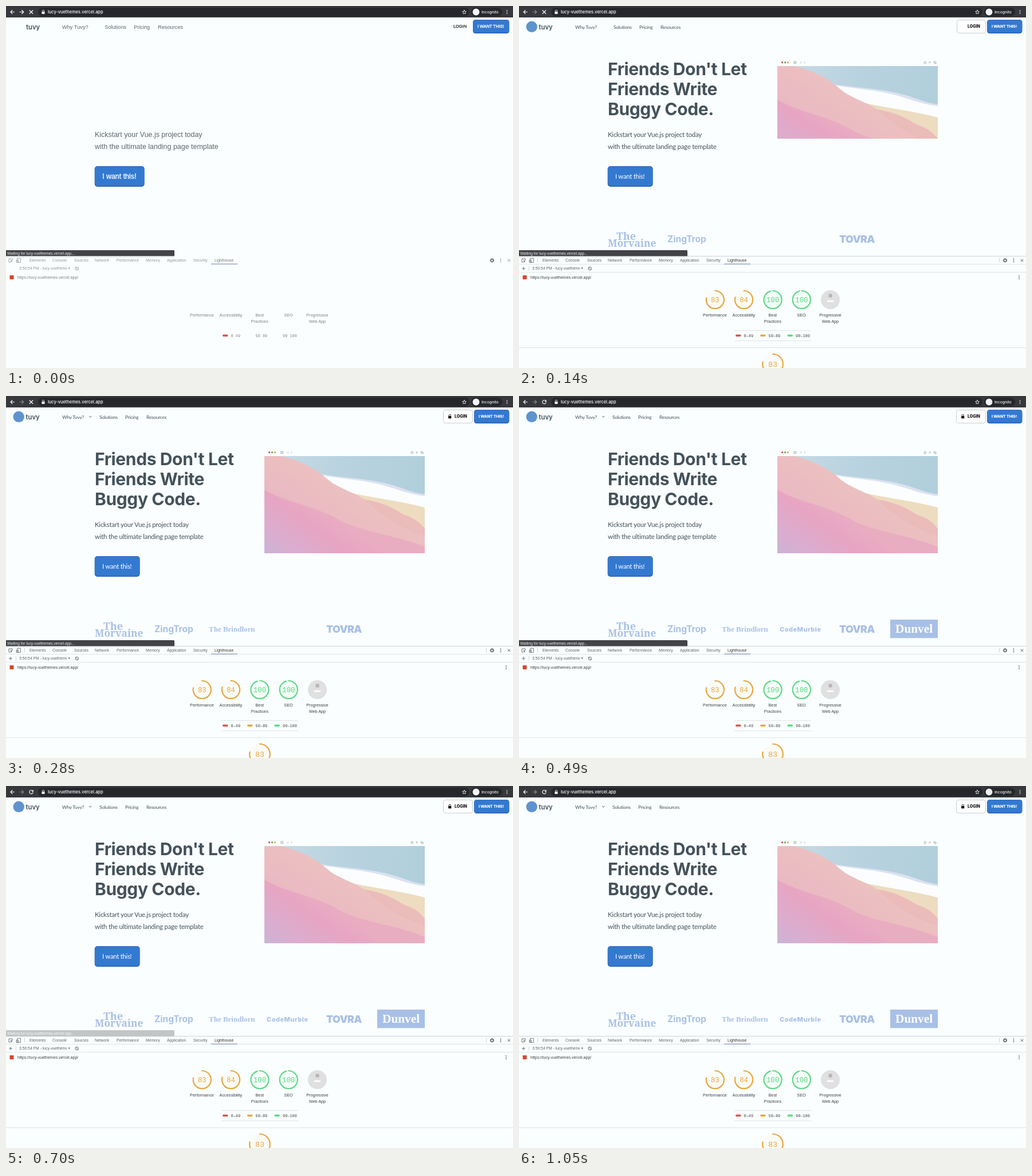
Recreate the animation shown at these times as an HTML page. Size 885x633 px, loop 1190 ms.

```html
<!DOCTYPE html>
<html lang="en">
<head>
<meta charset="utf-8">
<title>Landing page reload</title>
<style>
  html, body { margin: 0; width: 100%; height: 100%; overflow: hidden; background: #fafefe; }
  svg { display: block; width: 885px; height: 633px; }
  text { white-space: pre; }
  .sans { font-family: "Liberation Sans", Arial, sans-serif; }
  .lato { font-family: Lato, sans-serif; }
  .inter { font-family: Inter, sans-serif; }
  .mono { font-family: "Liberation Mono", monospace; }
  .serif { font-family: "Noto Serif", serif; }
  .times { font-family: "Liberation Serif", serif; }
  .line { fill: none; stroke-linecap: round; stroke-linejoin: round; }
</style>
</head>
<body>
<svg id="stage" viewBox="0 0 885 633" xmlns="http://www.w3.org/2000/svg"></svg>
<script>
const LOOP = 1190;
const INK = '#44525b', BLUE = '#3379d0', PRESS = '#a9c0e6';
const ORANGE = '#e9a63f', GREEN = '#5ed985', RED = '#d9534f';

const tracks = [];

// Group whose opacity follows a table of [time, opacity] steps.
function part(steps, ...content) {
  tracks.push(steps);
  return `<g data-track="${tracks.length - 1}">${content.join('')}</g>`;
}
const during = (from, to, ...content) => part([[from, 1], [to, 0]], ...content);
const after = (from, ...content) => part([[from, 1]], ...content);

const text = (x, y, str, size, font, fill, more = '') =>
  `<text x="${x}" y="${y}" font-size="${size}" class="${font}" fill="${fill}" ${more}>${str}</text>`;
const rect = (x, y, w, h, fill, r = 0, more = '') =>
  `<rect x="${x}" y="${y}" width="${w}" height="${h}" rx="${r}" fill="${fill}" ${more}/>`;
const circle = (x, y, r, fill, more = '') =>
  `<circle cx="${x}" cy="${y}" r="${r}" fill="${fill}" ${more}/>`;
const line = (d, stroke, width = 1) =>
  `<path class="line" d="${d}" stroke="${stroke}" stroke-width="${width}"/>`;
const shape = (d, fill, more = '') => `<path d="${d}" fill="${fill}" ${more}/>`;
const spacing = v => `letter-spacing="${v}"`;
const dots = (x, y, fill) => [-2.6, 0, 2.6].map(d => circle(x, y + d, .85, fill)).join('');
const padlock = (x, y, fill) =>
  rect(x - 2.6, y - .6, 5.2, 4.2, fill, .6) + line(`M${x - 1.6} ${y - .6}v-1.2a1.6 1.6 0 0 1 3.2 0v1.2`, fill, .9);

function browserBar() {
  const forward = 'M24 10.5h6.5M27.7 7.5l3 3-3 3';
  const pill = '#26272a';
  return [
    rect(0, 0, 885, 20, '#37383c'),
    rect(56, 3, 753, 15, pill, 7.5),
    rect(812, 3, 54, 15, pill, 7.5),
    line('M14.5 10.5h-6.5M11 7.5l-3 3 3 3', '#f1f3f4', 1.2),
    line(forward, '#85878a', 1.2),
    during(0, 70, line(forward, '#f1f3f4', 1.2)),
    during(0, 490, line('M41.2 7.7l5.6 5.6M46.8 7.7l-5.6 5.6', '#f1f3f4', 1.3)),
    after(490, line('M46.7 8.6a3.2 3.2 0 1 0 .5 2.6', '#f1f3f4', 1.2), shape('M47.8 6.6v3.5h-3.5z', '#f1f3f4')),
    padlock(65, 10.4, '#e8eaed'),
    text(73, 13, 'lucy-vuethemes.vercel.app', 7.4, 'inter', '#fff', 'font-weight="500"'),
    line('M800 7.2l1 2.2 2.4.3-1.8 1.6.5 2.4-2.1-1.2-2.1 1.2.5-2.4-1.8-1.6 2.4-.3z', '#e8eaed', .9),
    circle(820.5, 10.5, 5.9, '#f1f3f4'),
    text(830, 13, 'Incognito', 6.7, 'inter', '#f1f3f4', 'font-weight="500"'),
    dots(874.5, 10.5, '#e8eaed')
  ].join('');
}

function button(x, y, w, h, r) {
  return rect(x, y, w, h, '#2a63b3', r) + rect(x + .6, y + .6, w - 1.2, h - 2.2, BLUE, r - .5);
}

// First paint, before the web fonts are in.
function plainPage() {
  const nav = [[98, 'Why Tuvy?'], [172, 'Solutions'], [223, 'Pricing'], [265, 'Resources']];
  const grey = '#5d666c';
  return during(0, 70,
    text(35, 40.5, 'tuvy', 11.3, 'inter', INK, 'font-weight="600"'),
    ...nav.map(([x, s]) => text(x, 39.5, s, 9.24, 'sans', grey)),
    text(781, 38, 'LOGIN', 7.4, 'sans', '#222', 'stroke="#222" stroke-width=".25"'),
    button(815, 24, 63.5, 24, 4.5),
    text(823, 38, 'I WANT THIS!', 7.4, 'sans', '#fff', 'stroke="#fff" stroke-width=".35"'),
    text(155, 229, 'Kickstart your Vue.js project today', 12.44, 'sans', grey),
    text(155, 249.5, 'with the ultimate landing page template', 12.44, 'sans', grey),
    button(154.7, 280, 87, 36, 5),
    text(168, 301.5, 'I want this!', 12.44, 'sans', '#f2f8ff', 'stroke="#f2f8ff" stroke-width=".4"'));
}

function navLinks(x) {
  return [[0, 'Solutions'], [45, 'Pricing'], [82, 'Resources']]
    .map(([dx, s]) => text(x + dx, 39.5, s, 8.4, 'lato', INK, spacing(-.25))).join('');
}

const loginBox = x => rect(x, 24.5, 814.5 - x, 22.8, '#fff', 4, 'stroke="#c9ced2" stroke-width="1"');

function styledPage() {
  const headline = ["Friends Don't Let", 'Friends Write', 'Buggy Code.'];
  return after(70,
    circle(22.2, 36.3, 9.7, '#5f93cf'),
    text(34.5, 40.5, 'tuvy', 11.3, 'inter', INK, 'font-weight="600"'),
    text(98, 39.5, 'Why Tuvy?', 8.4, 'lato', INK, spacing(-.25)),
    during(70, 210, navLinks(165), loginBox(764.5)),
    after(210, navLinks(163), loginBox(763.5),
      line('M145.3 35.2l2 2 2-2', INK, .9), padlock(774.7, 35.6, '#111')),
    text(783, 38, 'LOGIN', 7, 'inter', '#111', 'font-weight="800"'),
    button(817, 24, 61.5, 24, 4.5),
    text(825, 38, 'I WANT THIS!', 6.8, 'inter', '#fff', 'font-weight="800" ' + spacing(-.1)),
    ...headline.map((s, i) => text(155, 121 + i * 35, s, 30, 'inter', INK, 'font-weight="700" ' + spacing(-.38))),
    text(155, 229, 'Kickstart your Vue.js project today', 11.4, 'lato', INK, spacing(-.2)),
    text(155, 249.5, 'with the ultimate landing page template', 11.4, 'lato', INK, spacing(-.22)),
    button(154.7, 280, 79, 36, 5),
    text(168, 301.5, 'I want this!', 11.3, 'lato', '#fff', spacing(-.25)));
}

function gradient(id, from, to, stops) {
  return `<linearGradient id="${id}" gradientUnits="userSpaceOnUse" x1="${from[0]}" y1="${from[1]}" x2="${to[0]}" y2="${to[1]}">` +
    stops.map(([at, c]) => `<stop offset="${at}" stop-color="${c}"/>`).join('') + '</linearGradient>';
}

function beach() {
  const grey = '#8d9499';
  const lights = [[459.5, '#d9534f'], [464.5, '#56b558'], [469.5, '#e6a94c']];
  return after(140,
    `<defs>
      ${gradient('sea', [480, 105], [731, 175], [[0, '#c5dae4'], [.4, '#b9d3df'], [1, '#b0cedb']])}
      ${gradient('dune', [590, 150], [520, 260], [[0, '#ecc1c0'], [.6, '#eabac2'], [1, '#e9aec2']])}
      ${gradient('shade', [550, 190], [475, 295], [[0, '#e9adc1'], [.3, '#e7a5c3'], [.7, '#dbadcf'], [1, '#c9b4d6']])}
      <clipPath id="frame"><rect x="451" y="105" width="280" height="170"/></clipPath>
    </defs>`,
    ...lights.map(([x, c]) => circle(x, 98.7, 1.6, c)),
    line('M480 97h4v3.4h-4zM481.5 97v3.4M492.8 97.2l-1.5 1.5 1.5 1.5M498 97.2l1.5 1.5-1.5 1.5', grey, .6),
    line('M707.5 98h3v2.8h-3zM709 98v-1.8M715.5 98.7h3M717 97.2v3M724.4 97h2.6v2.6h-2.6zM725.4 100.8h2.8v-2.6', grey, .6),
    '<g clip-path="url(#frame)">',
    rect(451, 105, 280, 170, 'url(#sea)'),
    shape('M550 137C590 143 625 144 660 152S700 167 731 172V198H600Z', '#dbe2f0'),
    shape('M553 139C590 145 625 147 658 156S700 171 731 175V200H600Z', '#fbfdfe'),
    shape('M600 169C640 178 690 184 731 195V240H620Z', '#eedcc0'),
    shape('M451 105H480C514 113 538 126 556 141C575 160 603 166 626 181C650 185 668 191 690 205C705 213 715 212 731 232V275H451Z', 'url(#dune)'),
    shape('M626 181C650 185 668 191 690 205C705 213 715 212 731 232V245C690 232 655 210 626 181Z', '#e9b7b6', 'opacity=".5"'),
    shape('M451 164C488 186 540 192 582 217C618 238 680 242 731 264V275H451Z', 'url(#shade)'),
    '</g>',
    during(140, 210, rect(450, 232, 282, 44, '#fafefe')));
}

function press() {
  const heavy = w => `font-weight="${w}" `;
  return [
    after(140,
      text(170, 409, 'The', 18, 'serif', PRESS, heavy(700)),
      text(155, 420.5, 'Morvaine', 17.3, 'serif', PRESS, heavy(700)),
      text(259, 413, 'ZingTrop', 15.5, 'inter', PRESS, heavy(700)),
      text(559, 414, 'TOVRA', 17.8, 'inter', PRESS, heavy(900) + spacing(-.6))),
    after(280, text(354, 411.5, 'The Brindlorn', 13, 'times', PRESS, heavy(700))),
    after(350, text(455, 411.5, 'CodeMurble', 11, 'inter', PRESS, heavy(800) + spacing(.5))),
    after(420, rect(648, 391, 83, 32.3, '#a8c0e6'),
      text(657, 414, 'Dunvel', 21.3, 'times', '#fff', heavy(700)))
  ].join('');
}

// The ring stops a little short of the score, leaving room for its round caps.
function gauge(x, y, r, score, color, size) {
  const turn = 2 * Math.PI * r;
  const sweep = turn * (score - 5) / 100;
  return circle(x, y, r, color, 'fill-opacity=".04"') +
    circle(x, y, r, 'none', `stroke="${color}" stroke-width="2.2" stroke-linecap="round"
      stroke-dasharray="${sweep} ${turn}" transform="rotate(-90 ${x} ${y})"`) +
    text(x, y + size * .34, score, size, 'mono', color, 'text-anchor="middle"');
}

function devtools() {
  const grey = '#5f6368', ink = '#3c4043', rule = '#dfe4e7';
  const tabs = [[41, 'Elements'], [81, 'Console'], [119, 'Sources'], [155, 'Network'], [193, 'Performance'],
    [244, 'Memory'], [281, 'Application'], [327, 'Security'], [364, 'Lighthouse']];
  const labels = [[342, 'Performance'], [392.4, 'Accessibility'], [442.8, 'Best', 'Practices'],
    [493, 'SEO'], [543.4, 'Progressive', 'Web App']];
  const legend = [[392.5, '0', '49'], [435.5, '50', '89'], [483, '90', '100']];
  const ranges = dash => legend.map(([x, a, b]) => text(x, 578.6, a + dash + b, 6.9, 'mono', '#444')).join('');
  const middle = 'text-anchor="middle"';
  return [
    rect(0, 437, 885, 196, '#fafefe'),
    after(70,
      line('M0 437.5H885', '#cdd3d6'), line('M0 451.5H885M0 465.5H885M0 597.5H885', rule),
      line('M32.5 441v7M838.5 441v7M17.5 455.5v7', '#cfd4d7'),
      line('M5.5 459h5M8 456.5v5', grey, .9),
      dots(873, 474.5, grey)),
    part([[0, .65], [70, 1]],
      line('M8 448H5v-6h6v2.5', grey, .9), shape('M7.6 444.2l4.2 1.7-1.8.7-.7 1.8z', grey),
      line('M20 441.3h5.5v7h-5.5zM18.5 444.3h3.2v4h-3.2z', grey, .8),
      ...tabs.map(([x, s]) => text(x, 447.2, s, 6.8, 'sans', s === 'Lighthouse' ? '#333' : grey)),
      dots(863.5, 444.8, grey),
      line('M876 442.8l4 4M880 442.8l-4 4', grey, 1),
      '<clipPath id="report"><rect x="22" y="453" width="84" height="12"/></clipPath>',
      '<g clip-path="url(#report)">', text(23, 461.3, '3:50:54 PM - lucy-vuetheme', 6.8, 'sans', grey), '</g>',
      shape('M108.4 457.6h3.6l-1.8 2.7z', grey),
      circle(123.7, 459, 2.8, 'none', `stroke="${grey}" stroke-width=".9"`), line('M121.8 457.1l3.8 3.8', grey, .9),
      text(20, 476.6, 'https://lucy-vuethemes.vercel.app/', 7, 'sans', ink),
      ...labels.map(([x, a, b = '']) =>
        text(x, 543.2, a, 7.3, 'sans', ink, middle) + text(x, 553.5, b, 7.3, 'sans', ink, middle)),
      during(0, 70, ranges(' '))),
    circle(848.5, 444.8, 2.3, 'none', `stroke="${grey}" stroke-width="1.5"`),
    circle(848.5, 444.8, 3.3, 'none', `stroke="${grey}" stroke-width="1" stroke-dasharray="1.3 1.29"`),
    rect(358, 450.6, 46, 1.1, '#748abb'),
    rect(6.5, 471, 7, 7, '#d8452f'),
    rect(378, 574.6, 9.5, 3.4, RED, 1.7),
    after(70,
      gauge(342.3, 513.6, 15.6, 83, ORANGE, 12.2),
      gauge(392.5, 513.6, 15.6, 84, ORANGE, 12.2),
      gauge(443, 513.6, 15.6, 100, GREEN, 12.2),
      gauge(493.3, 513.6, 15.6, 100, GREEN, 12.2),
      circle(543.5, 513.6, 16.5, '#e0e0e0'),
      rect(540.5, 503.5, 6, 6, '#b5b5b5'), rect(537.8, 514.8, 11.4, 2.6, '#fff', .6),
      line('M376 567.5H510M376 585.5H510', rule),
      rect(421, 574.6, 9.5, 3.4, ORANGE, 1.7), rect(468.5, 574.6, 9.5, 3.4, GREEN, 1.7),
      ranges('–'),
      gauge(443, 626.3, 17.8, 83, ORANGE, 13.4))
  ].join('');
}

function statusBar() {
  return part([[0, 1], [560, .7], [700, .3], [770, 0]],
    rect(0, 437, 294, 3, '#503050', 0, 'opacity=".07"'),
    shape('M0 427H292.5Q294 427 294 428.5V437.2H0Z', '#424346'),
    text(2, 434.5, 'Waiting for lucy-vuethemes.vercel.app...', 6.63, 'sans', '#eceef0'));
}

const stage = document.getElementById('stage');
stage.innerHTML = rect(0, 0, 885, 633, '#fafefe') + plainPage() + styledPage() + beach() +
  press() + devtools() + browserBar() + statusBar();
const groups = [...stage.querySelectorAll('[data-track]')];

function draw(t) {
  for (const g of groups) {
    let opacity = 0;
    for (const [at, value] of tracks[g.dataset.track]) if (t >= at) opacity = value;
    g.setAttribute('opacity', opacity);
  }
}

const start = performance.now();
function tick() {
  draw((performance.now() - start) % LOOP);
  requestAnimationFrame(tick);
}
tick();
</script>
</body>
</html>
```
